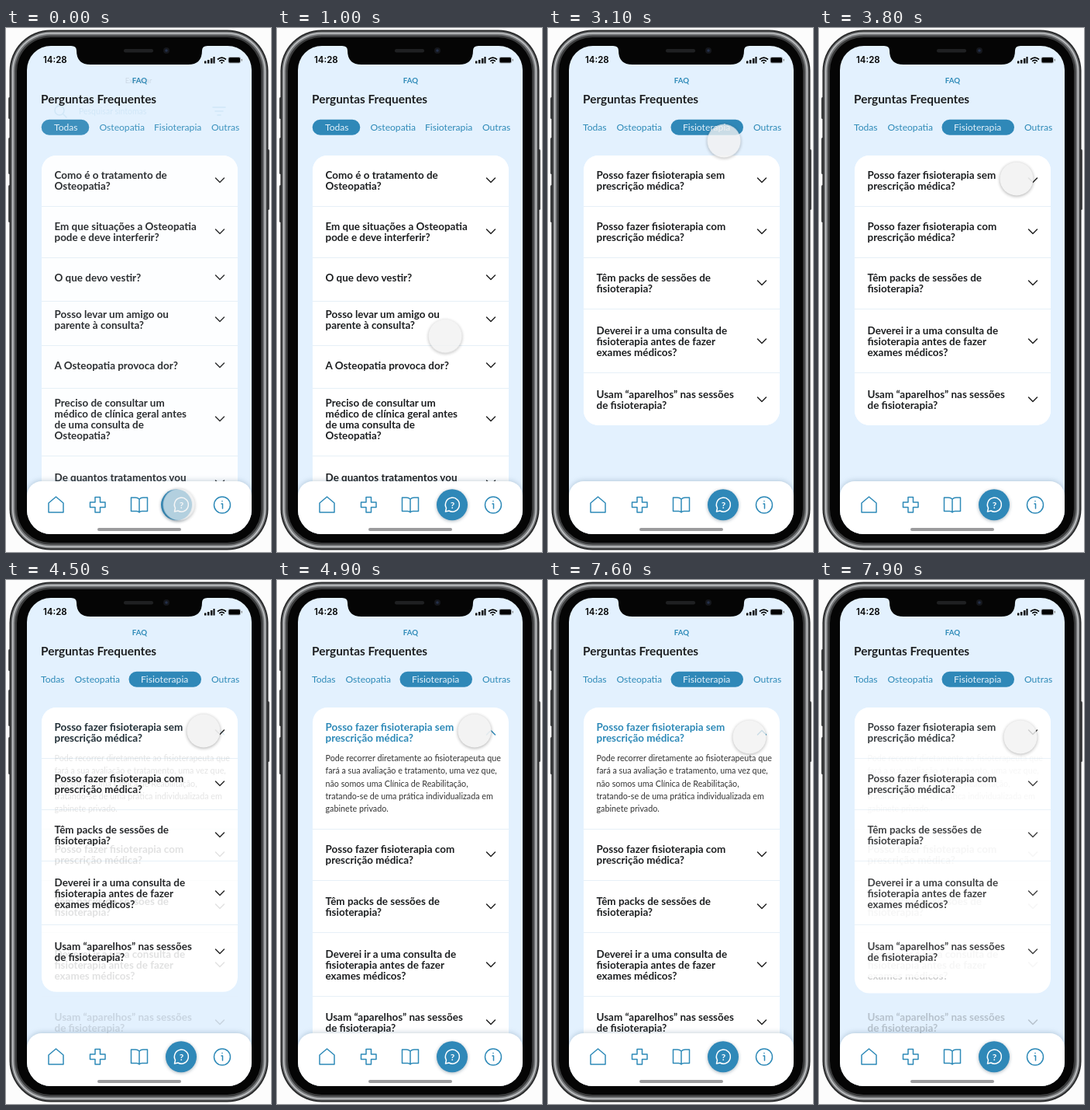
Recreate the animation shown at these times as an HTML page. Size 342 by 674 pixels, loop 8000 ms.

```html
<!DOCTYPE html>
<html lang="pt">
<head>
<meta charset="utf-8">
<title>Perguntas Frequentes</title>
<style>
html, body { margin: 0; width: 100%; height: 100%; overflow: hidden; background: #fcfcfc; }
svg { display: block; }
text { font-family: Lato, "Open Sans", sans-serif; white-space: pre; }
.blue { fill: #2e8ab8; }
.question { font-size: 13.45px; font-weight: 700; fill: #1d1f21; }
.question.blue { fill: #2e8ab8; }
.answer { font-size: 10.75px; fill: #333; }
.tab { font-size: 12.1px; fill: #2e8ab8; }
.line { fill: none; stroke: #2e8ab8; stroke-width: 1.5; stroke-linecap: round; stroke-linejoin: round; }
.chevron { fill: none; stroke: #222; stroke-width: 1.5; stroke-linecap: round; stroke-linejoin: round; }
.chevron.up { stroke: #2e8ab8; }
.rule { stroke: #e6f0f7; stroke-width: 1; }

.anim { animation: 8s linear infinite; }
#page { animation-name: page; }
#explore { animation-name: explore; }
#disc { animation-name: disc; }
#pill { animation-name: pill; }
#tabAll { animation-name: tab-all; }
#tabOsteo { animation-name: tab-osteo; }
#tabFisio { animation-name: tab-fisio; }
#card { animation-name: card; }
#all { animation-name: all; }
#closed { animation-name: closed; }
#open { animation-name: open; }
#reclosed { animation-name: reclosed; }
#touch { animation-name: touch; }

@keyframes page { 0% { opacity: .92 } 2%, 100% { opacity: 1 } }
@keyframes explore { 0% { opacity: .1 } 2%, 100% { opacity: 0 } }
@keyframes disc { 0% { transform: translateX(-6px) } 2%, 100% { transform: none } }
@keyframes pill {
  0%, 29.4% { x: 45.7px; width: 61.6px; animation-timing-function: ease-out }
  33.1%, 100% { x: 158.5px; width: 93.5px }
}
@keyframes tab-all {
  0%, 29.4% { transform: translateX(17px); fill: #e4f1fa; animation-timing-function: ease-out }
  33.1%, 100% { transform: none; fill: #2e8ab8 }
}
@keyframes tab-osteo {
  0%, 29.4% { transform: translateX(32px); animation-timing-function: ease-out }
  33.1%, 100% { transform: none }
}
@keyframes tab-fisio {
  0%, 29.4% { transform: translateX(17px); fill: #2e8ab8; animation-timing-function: ease-out }
  33.1%, 100% { transform: none; fill: #e4f1fa }
}
@keyframes card {
  0%, 29.4% { height: 440px; animation-timing-function: ease-out }
  33.1%, 55.7% { height: 347px; animation-timing-function: ease-out }
  60%, 97% { height: 438px; animation-timing-function: ease-out }
  100% { height: 347px }
}
@keyframes all {
  0%, 29.4% { opacity: 1; animation-timing-function: ease-in-out }
  33.1%, 100% { opacity: 0 }
}
@keyframes closed {
  0%, 29.4% { opacity: 0; animation-timing-function: ease-out }
  33.1%, 55.7% { opacity: 1; animation-timing-function: ease-in-out }
  60%, 100% { opacity: 0 }
}
@keyframes open {
  0%, 55.7% { opacity: 0 }
  60%, 97% { opacity: 1; animation-timing-function: ease-out }
  100% { opacity: 0 }
}
@keyframes reclosed {
  0%, 97% { opacity: 0; animation-timing-function: cubic-bezier(0, 0, .4, 1) }
  100% { opacity: 1 }
}
@keyframes touch {
  0% { transform: translate(223px, 613px) scale(.95); opacity: .68 }
  5% { transform: translate(222px, 613px); opacity: .8; animation-timing-function: ease-in-out }
  21%, 33% { transform: translate(211px, 129px); opacity: .8; animation-timing-function: ease-in }
  38.75% { transform: translate(227px, 145px); opacity: .8; animation-timing-function: ease-out }
  47%, 65% { transform: translate(255px, 194px); opacity: .92; animation-timing-function: ease-in-out }
  78%, 100% { transform: translate(260px, 202px); opacity: .8 }
}
</style>
</head>
<body>
<svg width="342" height="674" viewBox="0 0 342 674">
  <defs>
    <clipPath id="screen"><rect x="27" y="23" width="290" height="628" rx="31"/></clipPath>
    <g id="fisio"></g>
  </defs>

  <g fill="#4b4c4e">
    <rect x="3" y="89" width="4" height="28" rx="1.5"/>
    <rect x="3" y="141" width="4" height="47" rx="1.5"/>
    <rect x="3" y="202" width="4" height="48" rx="1.5"/>
    <rect x="336" y="156" width="4" height="78" rx="1.5"/>
  </g>
  <g id="body"></g>

  <g clip-path="url(#screen)">
    <rect x="27" y="23" width="290" height="628" fill="#e3f1fe"/>
    <text class="blue" x="172.5" y="71" font-size="9.7" font-weight="700" text-anchor="middle">FAQ</text>
    <text x="45" y="97" font-size="15.4" font-weight="700" fill="#1d1f21">Perguntas Frequentes</text>

    <g id="page" class="anim">
      <rect id="pill" class="anim" x="45.7" y="117.7" width="61.6" height="20" rx="10" fill="#2f88b8"/>
      <text id="tabAll" class="tab anim" x="45" y="132">Todas</text>
      <text id="tabOsteo" class="tab anim" x="88.5" y="132">Osteopatia</text>
      <text id="tabFisio" class="tab anim" x="174" y="132">Fisioterapia</text>
      <text class="tab" x="265" y="132">Outras</text>

      <rect id="card" class="anim" x="46" y="164" width="253" height="440" rx="19" fill="#fff"/>
      <g id="all" class="anim"></g>
      <use id="closed" class="anim" href="#fisio"/>
      <g id="open" class="anim"></g>
      <use id="reclosed" class="anim" href="#fisio"/>
    </g>

    <g id="explore" class="anim">
      <text x="171" y="71" font-size="9.5" text-anchor="middle">Explorar</text>
      <text class="blue" x="94" y="111" font-size="10.5">Pesquisar sintomas</text>
      <path class="line" d="M74 111l4 4M267 102h16M270 107h10M273 112h4"/>
      <circle class="line" cx="69" cy="106" r="6"/>
    </g>

    <rect x="27" y="583" width="290" height="90" rx="19" fill="#fff"
      style="filter: drop-shadow(0 -1px 3px rgba(60,100,130,.28))"/>
    <g id="disc" class="anim">
      <circle cx="226" cy="613.3" r="20" fill="#2f88b8" style="filter: drop-shadow(0 1px 2px rgba(0,40,70,.35))"/>
    </g>
    <g class="line">
      <path d="M55 611l9.5-8 9.5 8v12h-19z"/>
      <path d="M115 603.5h6.5v6.5h6.5v6.5h-6.5v6.5h-6.5v-6.5h-6.5v-6.5h6.5z"/>
      <path d="M172 606q-2-2-5-2h-5.5v17.5h7q2.5 0 3.5 1.5 1-1.5 3.5-1.5h7v-17.5h-5.5q-3 0-5 2zv17"/>
      <circle cx="279" cy="613.5" r="10.5"/>
      <path d="M278 612h1.5v6M279 608.5v.2"/>
      <path stroke="#fff" d="M217.5 622l1-4.5a9 9 0 1 1 3.5 3.5z"/>
    </g>
    <text x="226.5" y="617.5" font-size="12" font-weight="700" fill="#fff" text-anchor="middle">?</text>
    <rect x="118" y="643" width="108" height="4" rx="2" fill="#9b9b9d"/>

    <text x="48" y="45" font-size="11.5" font-weight="600" style="font-family: Inter, sans-serif">14:28</text>
    <path d="M256 45.5v-3h2.5v3zM260 45.5v-4.5h2.5v4.5zM264 45.5v-6.5h2.5v6.5zM267.5 45.5v-8.5h2v8.5z"/>
    <path fill="none" stroke="#000" stroke-width="1.7" d="M273 40.5q5.5-4.6 11 0M275.2 42.8q3.3-2.7 6.6 0"/>
    <path d="M276.8 44.3q1.7-1.3 3.4 0l-1.7 1.8z"/>
    <rect x="286.5" y="37" width="16.5" height="8.5" rx="2.5" fill="#a9b2ba"/>
    <rect x="287.5" y="38" width="14.5" height="6.5" rx="1.5"/>
    <rect x="303.7" y="39.7" width="1.2" height="3" rx=".6" fill="#888"/>
  </g>

  <path d="M84 20h176v3q-7 0-7 6 0 18-18 18H109q-18 0-18-18 0-6-7-6z" fill="#050505"/>
  <rect x="152" y="27" width="38" height="4.5" rx="2.25" fill="#1f2022"/>
  <circle cx="207" cy="29" r="4" fill="#15171c"/>
  <circle cx="207" cy="29" r="1.8" fill="#25304a"/>

  <g id="touch" class="anim">
    <circle r="21.5" fill="#f2f2f2" style="filter: drop-shadow(.5px 1.5px 2px rgba(0,0,0,.36))"/>
  </g>
</svg>

<script>
const fillHtml = (id, html) => document.getElementById(id).innerHTML = html;

// Nested outlines of the metal case: [inset, colour]
const rings = [[0, "#2a2b2c"], [2, "#77797b"], [3.5, "#c3c5c7"], [5, "#77797b"], [7, "#3a3b3c"], [9.5, "#050505"]];
fillHtml("body", rings.map(([inset, colour]) =>
  `<rect x="${4.5 + inset}" y="${2.5 + inset}" width="${334 - 2 * inset}" height="${669 - 2 * inset}"
    rx="${53 - inset}" fill="${colour}"/>`).join(""));

const chevron = (y, up) =>
  `<path class="chevron ${up ? "up" : ""}" d="M270.5 ${y + (up ? 3 : -3)}l5.5 ${up ? -5.5 : 5.5} 5.5 ${up ? 5.5 : -5.5}"/>`;

const lines = (list, y, step, style) => list.map((line, i) =>
  `<text class="${style}" x="62.5" y="${y + i * step}">${line}</text>`).join("");

function row(y, question, isOpen) {
  const list = question.split("|");
  return lines(list, y - 7 * (list.length - 1) + 4.7, 14, isOpen ? "question blue" : "question") + chevron(y, isOpen);
}

const rules = ys => ys.map(y => `<path class="rule" d="M46 ${y}.5h253"/>`).join("");
const backing = height => `<rect x="46" y="164" width="253" height="${height}" rx="19" fill="#fff"/>`;
const rows = (questions, centres, openIndex = -1) =>
  questions.map((question, i) => row(centres[i], question, i === openIndex)).join("");

const general = [
  "Como é o tratamento de|Osteopatia?",
  "Em que situações a Osteopatia|pode e deve interferir?",
  "O que devo vestir?",
  "Posso levar um amigo ou|parente à consulta?",
  "A Osteopatia provoca dor?",
  "Preciso de consultar um|médico de clínica geral antes|de uma consulta de|Osteopatia?",
  "De quantos tratamentos vou|precisar?"
];
const physio = [
  "Posso fazer fisioterapia sem|prescrição médica?",
  "Posso fazer fisioterapia com|prescrição médica?",
  "Têm packs de sessões de|fisioterapia?",
  "Deverei ir a uma consulta de|fisioterapia antes de fazer|exames médicos?",
  "Usam “aparelhos” nas sessões|de fisioterapia?"
];
const answer = [
  "Pode recorrer diretamente ao fisioterapeuta que",
  "fará a sua avaliação e tratamento, uma vez que,",
  "não somos uma Clínica de Reabilitação,",
  "tratando-se de uma prática individualizada em",
  "gabinete privado."
];

fillHtml("all", backing(440) + rules([229, 295, 351, 408, 463, 550]) +
  rows(general, [196, 262, 321, 375, 434, 503, 585]));
fillHtml("fisio", backing(347) + rules([229, 295, 361, 443]) +
  rows(physio, [196, 262, 328, 403, 478]));
fillHtml("open", rules([320, 386, 453, 535]) +
  rows(physio, [196, 353, 420, 495, 569], 0) + lines(answer, 233, 16.3, "answer"));
</script>
</body>
</html>
```
